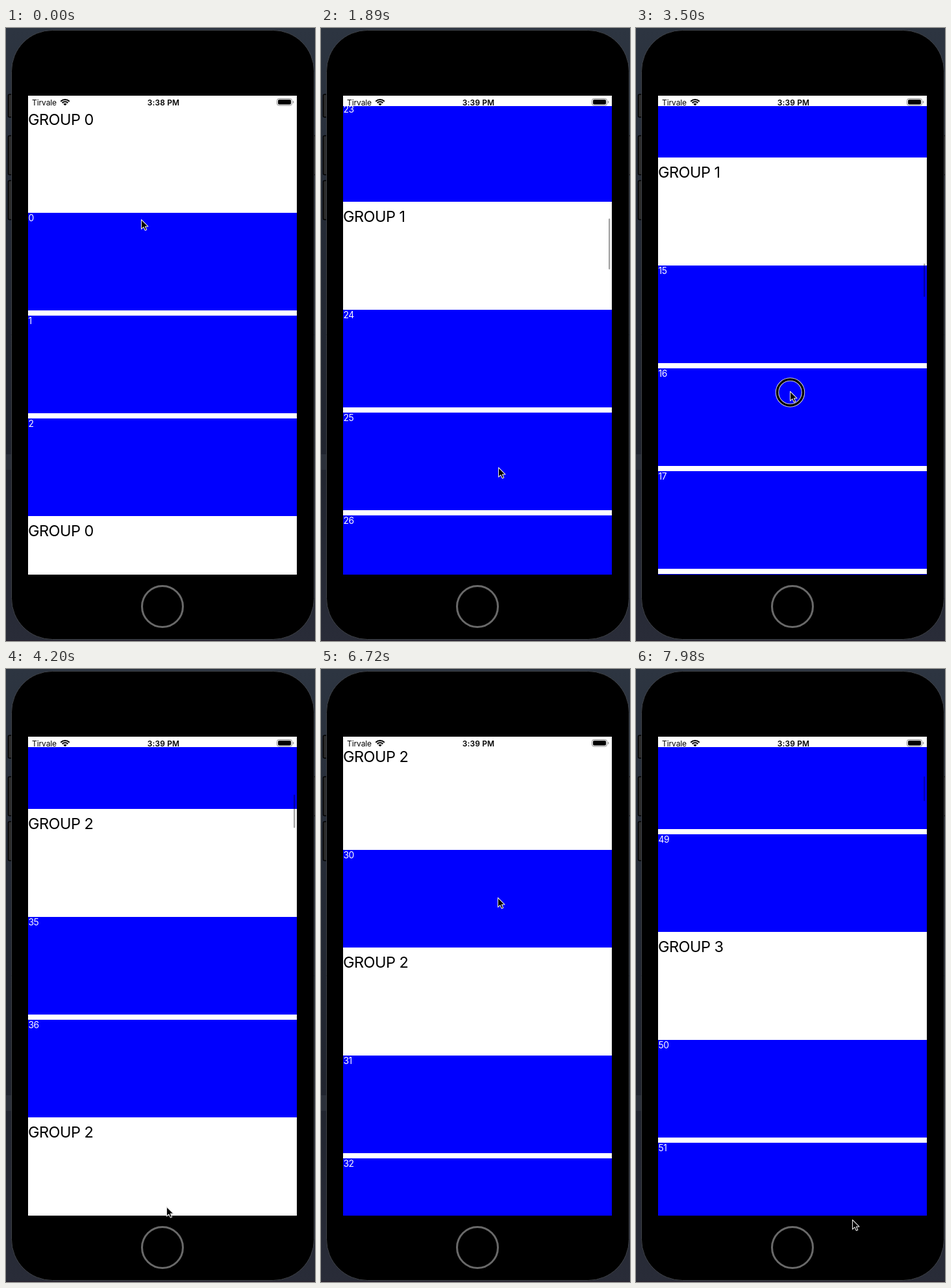
Write an HTML page with a canvas that moves like this. It is 476 by 942 pixels and loops after 8000 ms.

```html
<!DOCTYPE html>
<html lang="en">
<head>
<meta charset="utf-8">
<title>Grouped list</title>
<style>
  html, body { margin: 0; width: 100%; height: 100%; overflow: hidden; background: #262c37; }
  canvas { display: block; width: 476px; height: 942px; }
</style>
</head>
<body>
<canvas id="stage"></canvas>
<script>
const W = 476, H = 942, LOOP = 8000, STEP = 70;
const LEFT = 34, WIDTH = 414, TOP = 120, BOTTOM = 840, VIEW = BOTTOM - TOP;
const CARD = 150, PITCH = 158, PAGE = 15;
const FONT = 'Inter, Roboto, sans-serif';

const canvas = document.getElementById('stage');
const ctx = canvas.getContext('2d');
const dpr = window.devicePixelRatio || 1;
canvas.width = W * dpr;
canvas.height = H * dpr;

const glide = k => u => (1 - Math.exp(-k * u)) / (1 - Math.exp(-k));
const ease = {
  linear: u => u,
  in: u => u * u,
  out: u => u * (2 - u),
  inOut: u => u * u * (3 - 2 * u),
  flick: glide(3.713),
  fling: glide(2)
};

// Keys are [time, ...values, easing of the segment that ends here].
const SCROLL = [
  [0, 126], [140, 120, 'out'], [350, 120], [700, 380, 'in'],
  [1400, 1130, 'out'], [1470, 1130], [1820, 1450, 'in'], [1890, 1697],
  [2870, 3280, 'out'], [3150, 3280], [3500, 3367, 'in'], [3640, 3640],
  [5200, 6440, 'flick'], [5250, 6440], [5600, 6678, 'in'],
  [5760, 6800, 'out'], [6300, 6756, 'inOut'], [6900, 6756],
  [7300, 7230, 'in'], [7980, 9418, 'fling'], [8000, 9418]
];
const POINTER = [
  [0, 208, 294], [350, 215, 300, 'inOut'], [700, 232, 560, 'in'],
  [840, 240, 640, 'out'], [1400, 250, 340, 'inOut'], [1470, 250, 345],
  [1820, 270, 665, 'in'], [1890, 273, 675], [2100, 275, 690, 'out'],
  [2870, 245, 480, 'inOut'], [2940, 245, 480], [3150, 236, 471, 'inOut'],
  [3500, 237, 558, 'in'], [3640, 240, 831], [4200, 247, 826, 'inOut'],
  [4620, 250, 837, 'inOut'], [4760, 251, 835], [5200, 278, 460, 'inOut'],
  [5250, 278, 460], [5600, 276, 698, 'in'], [5800, 274, 720, 'out'],
  [6300, 272, 520, 'inOut'], [6450, 272, 520], [6720, 272, 351, 'inOut'],
  [6900, 272, 346], [7300, 300, 820, 'in'], [7420, 320, 846, 'out'],
  [7980, 333, 846, 'out'], [8000, 333, 846]
];
const BAR_ALPHA = [
  [0, 0], [350, 0], [420, 1], [3000, 1], [3150, 0], [3290, 1],
  [5950, 1], [6300, 0], [6900, 0], [6970, 1], [7840, 1], [8000, 0.8]
];
const PRESSES = [[350, 700], [1470, 1820], [3150, 3640], [5200, 5600], [6900, 7300]];
const PAGE_LOADS = [0, 70, 3010, 6790];

const HEADS = new Set([
  0, 3, 6, 8, 10, 12, 14, 15, 20, 24, 27, 29,
  30, 31, 35, 37, 40, 42, 44, 45, 47, 50, 53, 55, 57, 59
]);

// Every page is stacked above the one loaded before it.
const pages = [];
let rowsAbove = 0;
PAGE_LOADS.forEach((_, p) => {
  const rows = [];
  for (let n = p * PAGE; n < (p + 1) * PAGE; n++) {
    if (HEADS.has(n)) rows.push({ title: 'GROUP ' + p });
    rows.push({ label: String(n) });
  }
  if (p > 0) rowsAbove += rows.length;
  pages.push({ rows, first: -rowsAbove });
});

function sample(keys, t) {
  let i = 1;
  while (i < keys.length - 1 && t > keys[i][0]) i++;
  const a = keys[i - 1], b = keys[i];
  const last = b[b.length - 1];
  const named = typeof last === 'string';
  const u = Math.min(1, Math.max(0, (t - a[0]) / (b[0] - a[0])));
  const k = ease[named ? last : 'linear'](u);
  return b.slice(1, named ? -1 : undefined).map((v, j) => a[j + 1] + (v - a[j + 1]) * k);
}

function text(str, x, y, font, color, spacing = 0, align = 'left') {
  ctx.font = font + ' ' + FONT;
  ctx.letterSpacing = spacing + 'px';
  ctx.textAlign = align;
  ctx.fillStyle = color;
  ctx.fillText(str, x, y);
}

function box(x, y, w, h, r, fill, stroke, line = 1) {
  ctx.beginPath();
  ctx.roundRect(x, y, w, h, r);
  if (fill) { ctx.fillStyle = fill; ctx.fill(); }
  if (stroke) { ctx.strokeStyle = stroke; ctx.lineWidth = line; ctx.stroke(); }
}

function circle(x, y, r, color, line) {
  ctx.beginPath();
  ctx.arc(x, y, r, 0, Math.PI * 2);
  ctx.strokeStyle = color;
  ctx.lineWidth = line;
  ctx.stroke();
}

function drawPhone() {
  const bg = ctx.createLinearGradient(0, 0, 0, H);
  bg.addColorStop(0, '#2d3541');
  bg.addColorStop(0.3, '#252b36');
  bg.addColorStop(0.69, '#20242e');
  bg.addColorStop(1, '#292c38');
  ctx.fillStyle = bg;
  ctx.fillRect(0, 0, W, H);
  ctx.fillStyle = '#2b303a';
  ctx.fillRect(0, 655, 8, 24);
  ctx.fillStyle = '#2a202d';
  ctx.fillRect(0, 941, W, 1);
  for (const [x, y, h] of [[3.5, 102, 35], [3.5, 165.5, 60], [3.5, 234.5, 60], [470, 165.5, 60]]) {
    box(x, y, 9, h, 2, '#2b2b2b', '#000', 1.5);
  }
  box(8.5, 3.5, 466, 936, 63, '#000', '#3f4247');
  circle(241, 889, 31.5, '#696969', 3);
}

function drawList(t, scroll) {
  ctx.save();
  ctx.beginPath();
  ctx.rect(LEFT, TOP, WIDTH, VIEW);
  ctx.clip();
  pages.forEach((page, p) => {
    if (t < PAGE_LOADS[p]) return;
    page.rows.forEach((row, i) => {
      const y = scroll + (page.first + i) * PITCH;
      if (y < TOP - PITCH || y > BOTTOM) return;
      if (row.title) {
        text(row.title, LEFT, y + 23, '400 23.5px', '#000', -0.55);
      } else {
        ctx.fillStyle = '#00f';
        ctx.fillRect(LEFT, y, WIDTH, CARD);
        text(row.label, LEFT + 0.4, y + 13, '400 13.8px', '#fff', -0.3);
      }
    });
  });
  drawScrollBar(t, scroll);
  ctx.restore();
}

function drawScrollBar(t, scroll) {
  const loaded = pages.filter((_, p) => t >= PAGE_LOADS[p]);
  const rows = loaded.reduce((sum, page) => sum + page.rows.length, 0);
  const first = loaded[loaded.length - 1].first;
  const content = rows * PITCH;
  const offset = Math.max(0, TOP - scroll - first * PITCH);
  const h = VIEW * VIEW / content;
  const y = TOP + 2 + offset / content * (VIEW - 4);
  ctx.globalAlpha = sample(BAR_ALPHA, t)[0];
  box(443, y, 2.5, h, 1.25, 'rgba(0,0,0,0.35)');
  ctx.globalAlpha = 1;
}

function drawStatus(t) {
  text('Tirvale', 40, 119, '400 12px', '#000', -0.1);
  text(t < 1260 ? '3:38 PM' : '3:39 PM', 242.5, 119, '600 12px', '#000', 0.1, 'center');

  ctx.save();
  ctx.beginPath();
  ctx.moveTo(91, 119.3);
  ctx.arc(91, 119.3, 12, -Math.PI * 0.76, -Math.PI * 0.24);
  ctx.clip();
  circle(91, 119.3, 9.3, '#000', 2);
  circle(91, 119.3, 6, '#000', 2);
  circle(91, 119.3, 1.8, '#000', 3.6);
  ctx.restore();

  box(417.5, 108.5, 23, 10.5, 3, null, '#8c8c8c');
  box(419, 110, 20, 7.5, 1.8, '#000');
  box(442, 112, 1.3, 3.6, 0.7, '#8c8c8c');
}

function drawPointer(t) {
  const [x, y] = sample(POINTER, t).map(Math.round);
  if (PRESSES.some(([from, to]) => t >= from && t < to)) {
    circle(x + 0.5, y + 2, 20, '#c9c9d0', 5.5);
    circle(x + 0.5, y + 2, 20, '#000', 3.4);
  }
  ctx.save();
  ctx.translate(x + 0.5, y + 0.5);
  ctx.beginPath();
  for (const [px, py] of [[0, 0], [0, 14.5], [3.4, 11.4], [5.8, 16.6], [8.2, 15.6], [5.9, 10.6], [10.4, 10.4]]) {
    ctx.lineTo(px, py);
  }
  ctx.closePath();
  ctx.fillStyle = '#000';
  ctx.fill();
  ctx.strokeStyle = '#e2e2e2';
  ctx.lineWidth = 1.1;
  ctx.lineJoin = 'round';
  ctx.stroke();
  ctx.restore();
}

function draw(t) {
  ctx.setTransform(dpr, 0, 0, dpr, 0, 0);
  drawPhone();
  ctx.fillStyle = '#fff';
  ctx.fillRect(LEFT, 104, WIDTH, 736);
  drawList(t, Math.round(sample(SCROLL, t)[0]));
  drawStatus(t);
  drawPointer(t);
}

const start = performance.now();
function tick() {
  const t = (performance.now() - start) % LOOP;
  draw(Math.floor(t / STEP) * STEP);
  requestAnimationFrame(tick);
}
tick();
</script>
</body>
</html>
```
